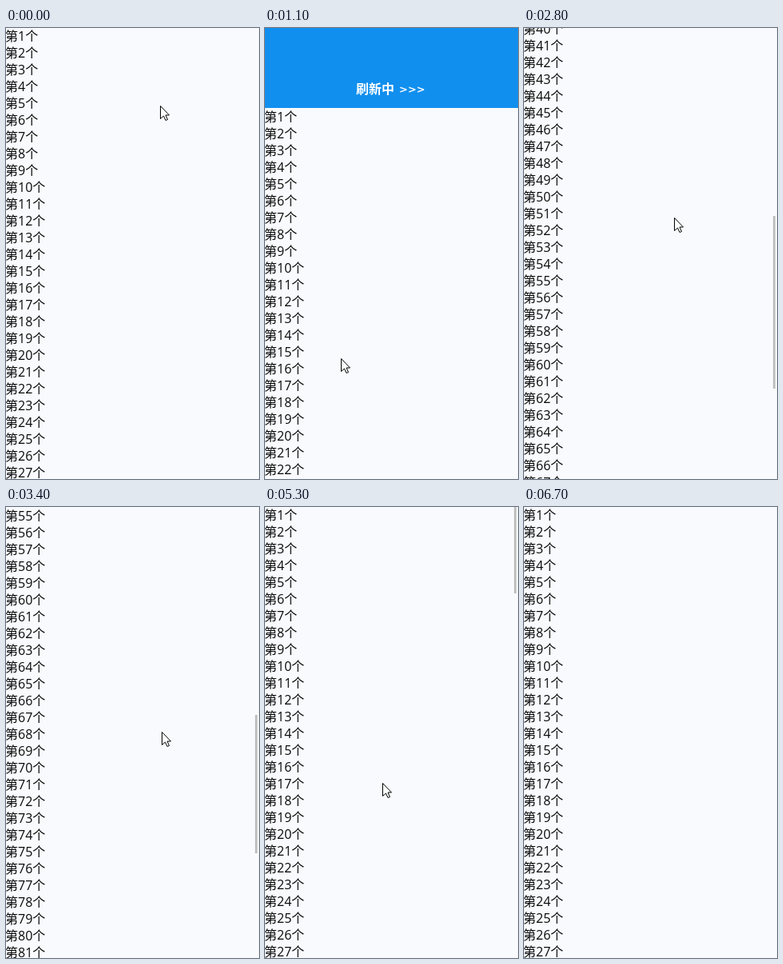
An HTML page with a canvas for the animation above (6900 ms loop, 317 by 564 pixels).

```html
<!DOCTYPE html>
<html lang="zh-CN">
<head>
<meta charset="utf-8">
<style>
  html, body { margin: 0; width: 317px; height: 564px; overflow: hidden; background: #f8fafd; }
  canvas { display: block; }
</style>
</head>
<body>
<canvas id="stage" width="317" height="564"></canvas>
<script>
const W = 317, H = 564, LOOP = 6900, STEP = 100, ROW = 21;
const SECOND_PULL = 5200, SCROLL_END = 1255;
const ctx = document.getElementById('stage').getContext('2d');
const FONT = '"Open Sans", "Noto Sans CJK SC", "Noto Sans CJK", sans-serif';
const ARROW = new Path2D('M.5 .5V16.5L4.5 13L7 18.5L9.5 17.5L7 12H11.5Z');

// Pointer stops: time, x, y
const STOPS = [[0, 193, 97], [900, 95, 413], [1400, 95, 413], [2000, 133, 324], [2800, 188, 237],
  [3600, 197, 295], [4000, 197, 295], [4200, 205, 77], [4300, 182, 99], [5300, 147, 345], [6000, 160, 420]];

// Progress from 0 to 1 between two times
const ramp = (t, from, to) => Math.min(1, Math.max(0, (t - from) / (to - from)));

// Drag down, settle at the refresh height, then close
const pullAt = u => Math.round(158 * ramp(u, 100, 800) - 57 * ramp(u, 900, 1100) - 101 * ramp(u, 1300, 1500));

const scrollAt = t => Math.round(SCROLL_END * (ramp(t, 1500, 3650) ** 0.8265 - ramp(t, 4400, 5200)));

function pointerAt(t) {
  const i = STOPS.findIndex(stop => stop[0] > t);
  if (i < 0) return STOPS[STOPS.length - 1].slice(1);
  const [t0, x0, y0] = STOPS[i - 1], [t1, x1, y1] = STOPS[i], p = ramp(t, t0, t1);
  return [x0 + (x1 - x0) * p, y0 + (y1 - y0) * p];
}

function drawList(offset) {
  ctx.fillStyle = '#0a0a0a';
  ctx.font = `16px ${FONT}`;
  for (let i = Math.max(0, Math.floor(-offset / ROW) - 1); i * ROW + offset < H; i++) {
    ctx.fillText(`第${i + 1}个`, -1, i * ROW + offset + 16);
  }
}

function drawHeader(pull, refreshing) {
  const label = refreshing ? '刷新中' : pull < 100 ? '下拉刷新' : '松开刷新';
  const x = 157.5 - (label.length * 16 + 39) / 2;
  ctx.fillStyle = '#118fee';
  ctx.fillRect(0, 0, W, pull - 1);
  ctx.fillStyle = '#fff';
  ctx.font = `bold 16px ${FONT}`;
  ctx.fillText(label, x, pull - 19);
  ctx.font = 'bold 13px "DejaVu Sans", sans-serif';
  ctx.fillText('>>>', x + label.length * 16 + 6, pull - 20);
}

// The thumb shrinks as more rows load on the way down, then keeps its length
function drawThumb(scroll, loading) {
  const top = Math.round(loading ? 290 * (1 - Math.exp(-scroll / 500)) : scroll * 0.19);
  const bottom = Math.round(loading ? 501 - scroll * 0.06 : top + 108);
  ctx.fillStyle = '#c1c1c1';
  ctx.fillRect(312, top, 3, bottom - top);
}

function drawPointer(x, y) {
  ctx.save();
  ctx.translate(Math.round(x), Math.round(y));
  ctx.fillStyle = '#fff';
  ctx.strokeStyle = '#000';
  ctx.fill(ARROW);
  ctx.stroke(ARROW);
  ctx.restore();
}

function draw(t) {
  const u = t < SECOND_PULL ? t : t - SECOND_PULL;
  const pull = pullAt(u), scroll = scrollAt(t);
  ctx.fillStyle = '#f8fafd';
  ctx.fillRect(0, 0, W, H);
  drawList(pull - scroll);
  if (pull > 0) drawHeader(pull, u >= 1000);
  if ((t > 1500 && t < 4200) || (t >= 4500 && t < 5500)) drawThumb(scroll, t < 4200);
  if (t < 6600) drawPointer(...pointerAt(t));
}

function tick() {
  draw(Math.floor(performance.now() % LOOP / STEP) * STEP);
  requestAnimationFrame(tick);
}
tick();
</script>
</body>
</html>
```
